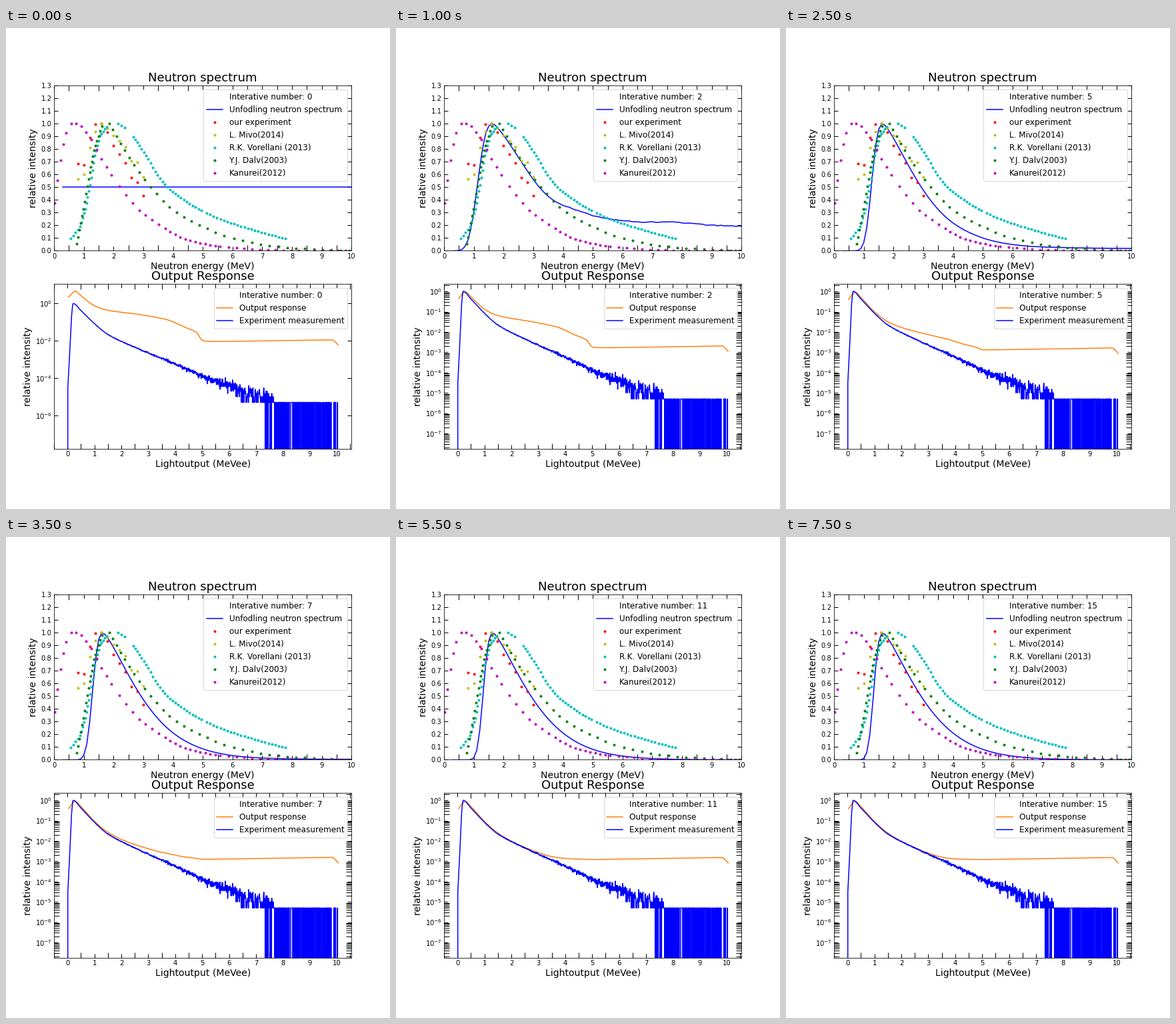
These frames come from a looping animation (576x720 px, 8000 ms). A matplotlib script:

```python
import numpy as np
import matplotlib.pyplot as plt
from matplotlib.animation import FuncAnimation
from matplotlib.ticker import LogLocator, MultipleLocator, NullFormatter, NullLocator

STEPS = 16
PEAK = 1.65
rng = np.random.default_rng(12)


def smooth(x, pts):
    """Monotone cubic through a few key points."""
    xs, ys = np.transpose(pts).astype(float)
    h = np.diff(xs)
    d = np.diff(ys) / h
    m = np.r_[d[0], np.zeros(len(d) - 1), d[-1]]
    same = d[:-1] * d[1:] > 0
    a, b = d[:-1][same], d[1:][same]
    m[1:-1][same] = 2 * a * b / (a + b)
    i = np.clip(np.searchsorted(xs, x) - 1, 0, len(h) - 1)
    t = (x - xs[i]) / h[i]
    return (ys[i] * (1 + 2 * t) * (1 - t) ** 2 + ys[i + 1] * t * t * (3 - 2 * t)
            + h[i] * (m[i] * t * (1 - t) ** 2 - m[i + 1] * t * t * (1 - t)))


def trail(count, pts):
    """Dots spread evenly over the segments of a path."""
    k = np.linspace(0, len(pts) - 1, count)
    e, v = np.transpose(pts)
    return [np.interp(k, np.arange(len(pts)), s) for s in (e, v)]


def dots(e, pts):
    return [e, smooth(e, pts)]


# Neutron spectrum: the rise steepens and the flat tail dies out with n
energy = np.arange(3, 101) / 10
past = np.maximum(energy - PEAK, 0)
final = np.exp(-.5 * past ** 1.33)
first = (.44 + .56 * np.exp(-(past / 1.95) ** 1.3) - .02 * (energy / 10) ** 6
         + .045 * np.exp(-((energy - 7.6) / 1.1) ** 2)
         + rng.normal(0, .005, len(energy)) * (past > 2))
fade = .78 * (1 + .5 * np.exp(-((energy - 3.3) / .8) ** 2))


def spectrum(n):
    if n == 0:
        return np.full_like(energy, .5)
    half = .29 + .46 * n ** -.9
    rise = 2 ** -(np.maximum(PEAK - energy, 0) / half) ** 2.8
    return rise * (final + (first - final) * np.exp(-fade * (n - 1)))


# Output response: signal, a fading shoulder and a plateau
light = np.linspace(.04, 10.05, 600)
signal = 10 ** smooth(light, [(.04, -.41), (.15, -.2), (.28, -.05), (.5, -.31), (1, -1.05),
                              (1.5, -1.64), (2, -2.08), (3, -2.89), (4, -4), (10.1, -9)])
shoulder = 10 ** smooth(light, [(0, -1.1), (2, -1.2), (3.6, -1.53), (4.4, -2.05),
                                (4.8, -2.4), (5.1, -3.8), (10.1, -9)])
plateau = 10 ** (.022 * np.maximum(light - 5, 0)
                 - .28 * (np.maximum(light - 9.82, 0) / .23) ** 1.5)


def response(n):
    if n == 0:
        r = response(1)
        return r * 4.5 / r.max()
    left = np.exp(-.55 * (n - 1))
    return signal + shoulder * left + plateau * (.0012 + .0007 * left)


def measurement():
    """Smooth decay with counting noise."""
    unit = 5e-6
    x = np.arange(1006) / 100
    y = 10 ** smooth(x, [(0, -4.8), (.05, -3.5), (.11, -1.83), (.16, -.5), (.21, 0),
                         (.5, -.38), (1, -1.08), (1.5, -1.66), (2, -2.03), (3, -2.65),
                         (4, -3.24), (5, -3.88), (6, -4.42), (7, -4.9), (8, -5.25),
                         (10.1, -5.6)])
    counts = rng.poisson(y / unit)
    counts = np.where(x < 7.3, np.maximum(counts, 1), counts)
    counts = np.where(x > 7.7, np.minimum(counts, 1), counts)
    y = np.where(x > .6, counts * unit, y)
    y[0] = 0
    return x, y


step = np.arange(.8, 3.01, .2)
red = dots(step, [(.8, .685), (1, .675), (1.2, .89), (1.4, .995), (1.6, 1), (2, .83),
                  (2.4, .69), (2.6, .575), (2.8, .54), (3, .435)])
yellow = dots(step, [(.8, .565), (1, .6), (1.2, .815), (1.6, 1), (2, .905), (2.4, .82),
                     (2.6, .71), (2.8, .695), (3, .58)])
i = np.arange(28)
cyan = np.hstack([
    trail(25, [(.56, .095), (.88, .19), (1.05, .33), (1.21, .52), (1.37, .75),
               (1.54, .905), (1.77, .975)]),
    dots(np.r_[2.16:2.37:3j, 2.67 + .066 * i + .00069 * i * i, 5.13:7.78:24j],
         [(2.16, 1), (2.37, .97), (2.67, .895), (3.09, .75), (3.54, .575), (3.87, .49),
          (4.63, .36), (5.6, .25), (6.75, .16), (7.78, .095)]),
])
i = np.arange(20)
green = np.hstack([
    trail(20, [(.76, .055), (.965, .315), (1.19, .595), (1.345, .8), (1.61, .98)]),
    dots(np.r_[1.86 + .11 * i + .0049 * i * i, 6.05:9.92:14j],
         [(1.86, 1), (2.35, .8), (3.02, .57), (3.97, .33), (5, .19), (6.05, .097),
          (7.26, .039), (8.4, .017), (10, 0)]),
])
magenta = dots(np.r_[.02:.41:5j, .58:1.93:9j, 2.2:3.74:8j, 3.9:5.58:11j, 5.87:9.8:16j],
               [(0, .34), (.2, .69), (.41, .93), (.58, 1), (.76, 1), (1.12, .925),
                (1.61, .715), (2.2, .51), (2.84, .325), (3.52, .21), (4.35, .098),
                (5.58, .035), (7.2, .007), (10, 0)])

fig, (top, low) = plt.subplots(2, 1, figsize=(8, 10), dpi=72)
fig.subplots_adjust(left=.125, right=.9, bottom=.125, top=.88, hspace=.2)


def dress(ax, title, xlabel):
    ax.set_title(title, fontsize=18)
    ax.set_xlabel(xlabel, fontsize=14, labelpad=3)
    ax.set_ylabel("relative intensity", fontsize=14)
    ax.xaxis.set_major_locator(MultipleLocator(1))
    ax.xaxis.set_minor_locator(MultipleLocator(.5))
    for which, length in [("major", 6), ("minor", 8)]:
        ax.tick_params(which=which, direction="in", length=length, width=1,
                       top=True, right=True)
    return ax.legend(loc="upper right", fontsize=12).get_texts()[0]


for ax in (top, low):
    ax.plot([], [], " ", label="Interative number: 0")

spec_line, = top.plot(energy, spectrum(0), "b", label="Unfodling neutron spectrum ")
for data, color, name in [(red, "r", "our experiment"),
                          (yellow, "y", "L. Mivo(2014)"),
                          (cyan, "c", "R.K. Vorellani (2013)"),
                          (green, "g", "Y.J. Dalv(2003)"),
                          (magenta, "m", "Kanurei(2012)")]:
    top.plot(*data, color + ".", label=name)
top.set(xlim=(0, 10), ylim=(0, 1.3))
top.yaxis.set_major_locator(MultipleLocator(.1))

low.set_yscale("log")
resp_line, = low.plot(light, response(0), color="tab:orange", label="Output response")
low.plot(*measurement(), "b", label="Experiment measurement")
low.set_xlim(-.5025, 10.5525)

labels = [dress(top, "Neutron spectrum", "Neutron energy (MeV)"),
          dress(low, "Output Response", "Lightoutput (MeVee)")]


def update(n):
    spec_line.set_ydata(spectrum(n))
    r = response(n)
    resp_line.set_ydata(r)
    for text in labels:
        text.set_text(f"Interative number: {n}")
    floor, peak = -7.39, max(0, np.log10(r.max()))
    pad = .05 * (peak - floor)
    low.set_ylim(10 ** (floor - pad), 10 ** (peak + pad))
    # the wider range labels every second decade only
    axis = low.yaxis
    axis.set_major_locator(LogLocator(10 if n else 100, numticks=20))
    axis.set_minor_locator(LogLocator(10, subs=range(2, 10), numticks=20) if n
                           else NullLocator())
    axis.set_minor_formatter(NullFormatter())
    return spec_line, resp_line, *labels


anim = FuncAnimation(fig, update, frames=STEPS, interval=500, repeat=True, repeat_delay=0)
plt.show()
```
